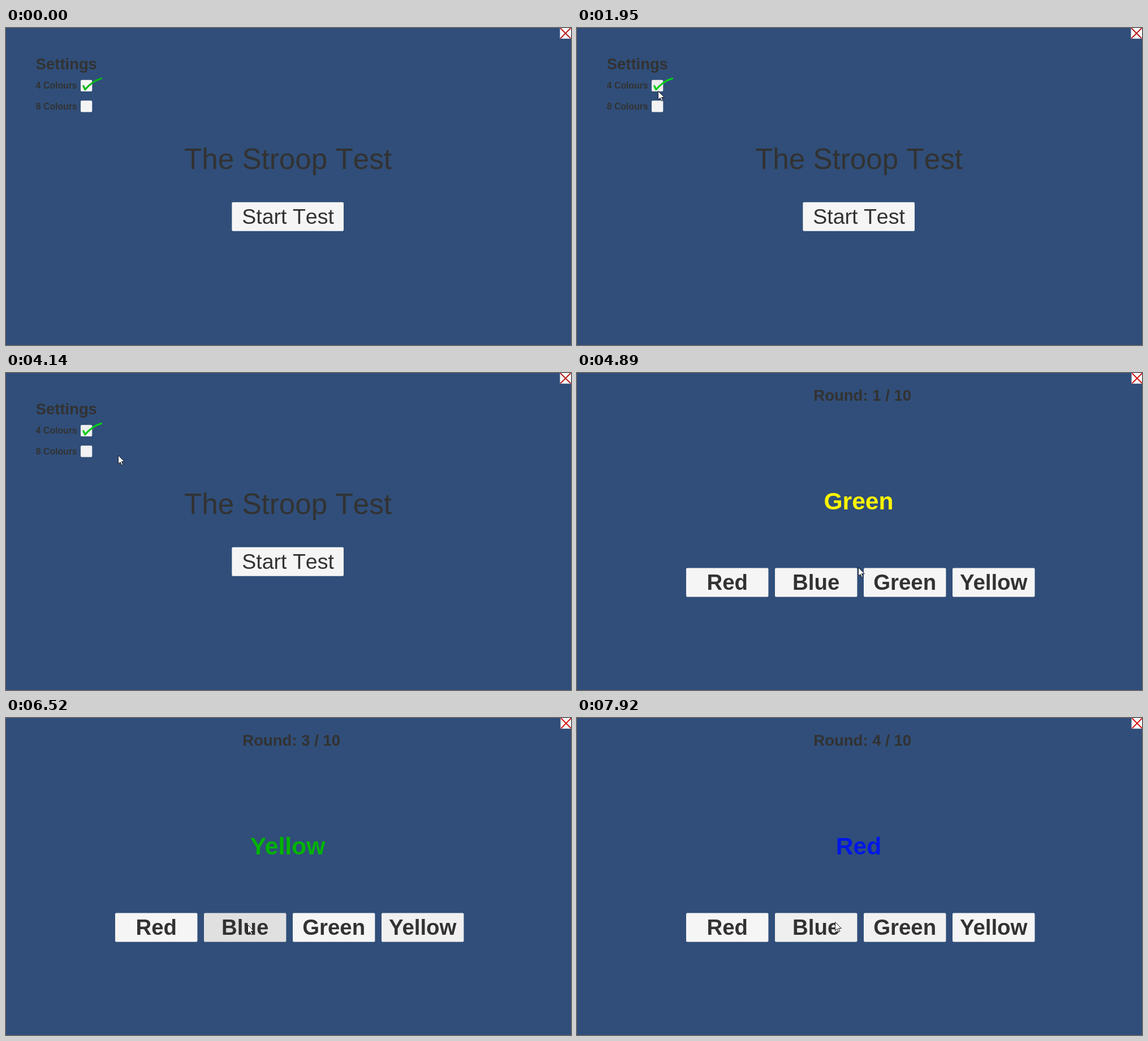
An HTML page that plays this animation: 999x560 px, repeating every 8000 ms.

```html
<!DOCTYPE html>
<html lang="en">
<head>
<meta charset="utf-8">
<title>The Stroop Test</title>
<style>
  html, body { margin: 0; width: 100%; height: 100%; overflow: hidden; background: #304e79; }
  svg { display: block; width: 999px; height: 560px; }
  text { font-family: "Liberation Sans", Arial, sans-serif; fill: #323232; white-space: pre; }
  .b { font-weight: bold; }
  .m { text-anchor: middle; }
  .loose { font-kerning: none; }
  .check { fill: none; stroke-width: 3.2; stroke-linecap: round; stroke-linejoin: round; }
</style>
</head>
<body>
<svg viewBox="0 0 999 560">
  <rect width="999" height="560" fill="#304e79"/>

  <g id="close">
    <rect x="979.5" width="21" height="18.8" fill="#fafafa"/>
    <path fill="none" stroke-width="1.9" d="M980.3 .3 L998.3 18.3 M998.3 .3 L980.3 18.3"/>
  </g>

  <g id="menu">
    <text class="b" x="52.8" y="73" font-size="27.4">Settings</text>
    <text class="b" x="52.8" y="107" font-size="15.8">4 Colours</text>
    <text class="b" x="52.8" y="143.6" font-size="15.8">8 Colours</text>
    <rect id="box4" x="132" y="91.7" width="20.3" height="20.3" rx="2"/>
    <rect id="box8" x="132" y="128.2" width="20.3" height="20.3" rx="2"/>
    <path id="check" class="check" d="M136.8 102.4 L139.8 108.8 C147 100.3 156 92.6 168.4 89.2"/>
    <text class="m loose" x="498.5" y="249" font-size="51.2">The Stroop Test</text>
    <rect x="399.4" y="307.7" width="197.6" height="51" rx="2" fill="#f5f5f5"/>
    <text class="m loose" x="498.6" y="346.4" font-size="37.5">Start Test</text>
  </g>

  <g id="test">
    <text id="round" class="b m" x="504.7" y="49" font-size="27.5"></text>
    <text id="word" class="b m" x="498" y="240.5" font-size="42.6"></text>
    <g id="buttons"></g>
  </g>

  <path id="cursor" d="M0 0 V15.2 L3.6 11.9 L6 17.3 L8.3 16.3 L6 11.1 H10.8 Z"
        fill="#fff" stroke="#15151c" stroke-width="1"/>
</svg>
<script>
const LOOP = 8000, LEAD = 100, STEP = 108.5;
const $ = id => document.getElementById(id);

// Where the pointer stops and what it clicks there; time counts screen updates
const stops = [
  [-1, 752, 528], [8, 146, 134, "8"], [12, 146, 134],
  [15, 143, 107, "4"], [20, 146, 136, "8"], [24, 145, 107, "4"],
  [30, 149, 144, "8"], [34, 146, 110, "4"], [42, 497, 343, "start"],
  [47, 497, 343], [52, 705, 366, "Yellow"], [57, 421, 365, "Blue"],
  [64, 605, 369, "Green"], [67, 605, 369], [70, 300, 370], [73, 456, 360]
].map(([at, x, y, hit]) => ({ at, x, y, hit }));

const inks = { Red: "#e00000", Blue: "#0018e6", Green: "#00b400", Yellow: "#fff500" };
const names = Object.keys(inks);
const rounds = [["Green", "Yellow"], ["Red", "Blue"], ["Yellow", "Green"], ["Red", "Blue"]];

const WIDTH = 145.4, buttonX = i => 193 + 157 * i;
const ease = f => f < .5 ? 4 * f ** 3 : 1 - 4 * (1 - f) ** 3;
const clamp = f => Math.min(1, Math.max(0, f));
const hits = k => stops.filter(s => s.hit && s.at < k);

function add(tag, attrs, label = "") {
  const el = document.createElementNS("http://www.w3.org/2000/svg", tag);
  for (const key in attrs) el.setAttribute(key, attrs[key]);
  el.textContent = label;
  return $("buttons").appendChild(el);
}

const plates = names.map((name, i) => {
  const x = buttonX(i);
  const plate = add("rect", { x, y: 344.6, width: WIDTH, height: 50.8, rx: 2 });
  add("text", { class: "b m", x: x + WIDTH / 2, y: 383.4, "font-size": 38.4 }, name);
  return plate;
});

// Eased travel between stops, with one update of rest at each end
function cursorAt(k) {
  const i = stops.findIndex(s => s.at >= k), a = stops[i - 1], b = stops[i];
  const f = ease(clamp((k - a.at - 1) / (b.at - a.at - 2)));
  return [a.x + (b.x - a.x) * f, a.y + (b.y - a.y) * f];
}

// A pressed control darkens, then fades back
function shade(el, name, k, depth, hover = 0) {
  const press = hits(k + 1).filter(s => s.hit === name).pop();
  const v = Math.round(245 - hover - (press ? depth * .8 ** (k - press.at) : 0));
  el.setAttribute("fill", `rgb(${v},${v},${v})`);
}

function drawMenu(k) {
  const past = hits(k), last = past[past.length - 1];
  const drop = last && last.hit === "8" ? 36.5 : 0;
  $("check").setAttribute("transform", `translate(0 ${drop})`);
  $("check").setAttribute("stroke", last ? "#08cf16" : "#08b716");
  for (const n of ["4", "8"]) shade($("box" + n), n, k, 12);
}

function drawTest(k, x, y) {
  const answered = hits(k).filter(s => s.hit in inks).length;
  const [label, ink] = rounds[answered];
  $("round").textContent = `Round: ${answered + 1} / 10`;
  $("word").textContent = label;
  $("word").style.fill = inks[ink];
  plates.forEach((plate, i) => {
    const over = y > 345 && x > buttonX(i) && x < buttonX(i) + WIDTH;
    shade(plate, names[i], k, 25, over ? 5 : 0);
  });
}

function draw(t) {
  const k = Math.floor((t - LEAD) / STEP);
  const [x, y] = cursorAt(Math.max(k, 0));
  const testing = hits(k).some(s => s.hit === "start");
  $("menu").style.display = testing ? "none" : "";
  $("test").style.display = testing ? "" : "none";
  testing ? drawTest(k, x, y) : drawMenu(k);

  $("close").setAttribute("transform", `translate(${testing ? 1 : 0} 0)`);
  $("close").setAttribute("stroke", testing ? "#d40a0a" : "#b40c0c");
  $("close").firstElementChild.setAttribute("stroke", "none");

  $("cursor").style.display = k < 0 ? "none" : "";
  $("cursor").setAttribute("transform", `translate(${Math.round(x) + .5} ${Math.round(y) + .5})`);
}

const start = performance.now();
function tick() {
  draw((performance.now() - start) % LOOP);
  requestAnimationFrame(tick);
}
tick();
</script>
</body>
</html>
```
